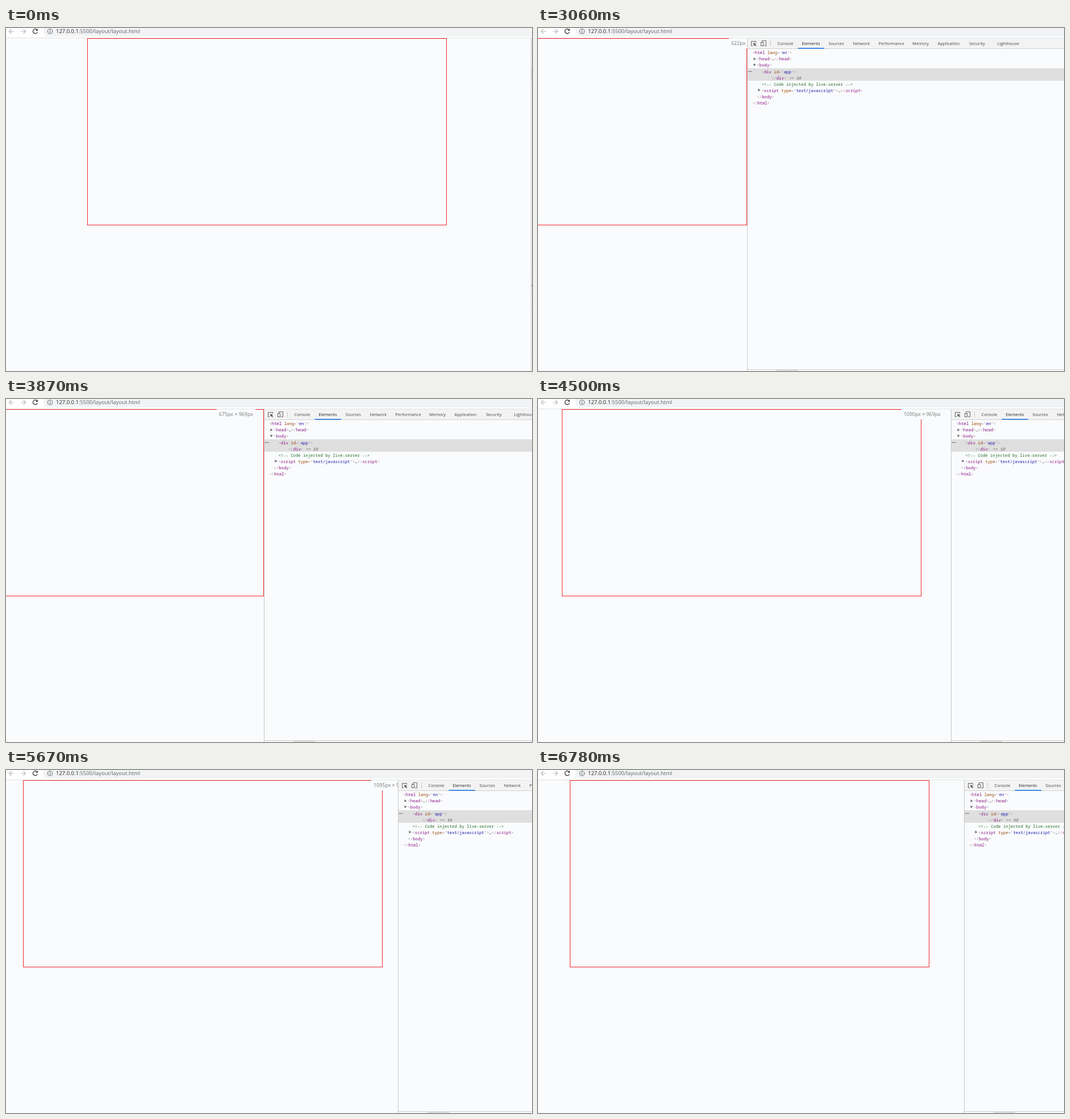
Recreate the animation shown at these times as an HTML page. Size 926 by 605 pixels, loop 7.29 s.

```html
<!DOCTYPE html>
<html lang="en">
<head>
<meta charset="utf-8">
<title>Layout resize</title>
<style>
  html, body { margin: 0; width: 100%; height: 100%; overflow: hidden; background: #f9fbfd; }
  svg { display: block; width: 926px; height: 605px; }
  text { white-space: pre; font-family: "Open Sans", "Noto Sans", sans-serif; font-size: 7.45px; fill: #444; }
  .mono { font-family: "Noto Sans Mono", "DejaVu Sans Mono", monospace; font-size: 7.25px; fill: #a894a6; }
  .url { font-size: 9.45px; fill: #5f6368; }
  .size { font-size: 8.9px; fill: #777; }
  .tag { fill: #881280; }
  .attr { fill: #994500; }
  .val { fill: #1a1aa6; }
  .note { fill: #236e25; }
  .ref { fill: #777; font-style: italic; }
  .dark { fill: #222; }
  .grey { fill: #777; }
  .prop { fill: #c80000; }
  .icon { fill: none; stroke: #5f6368; }
</style>
</head>
<body>
<svg viewBox="0 0 926 605">
  <rect width="926" height="18" fill="#fff"/>
  <path d="M926 0V15H74Q66 15 66 5V0Z" fill="#f1f3f4"/>
  <rect y="17" width="926" height="1" fill="#dfe1e4"/>
  <g class="icon" stroke-width="1.2">
    <path d="M14 6H5.5M9.5 2L5.5 6L9.5 10M26 6H34.5M30.5 2L34.5 6L30.5 10" stroke="#b8babd" style="stroke:#b8babd"/>
    <path d="M54.6 3.3A4 4 0 1 0 55.2 7.2" stroke-width="1.4" style="stroke:#444"/>
    <path d="M56 1V5H52Z" stroke="none" style="fill:#444;stroke:none"/>
    <circle cx="77.5" cy="6" r="4.1" stroke-width="1"/>
    <path d="M77.5 5.5V8.4M77.5 3.6V4.6"/>
  </g>
  <text class="url" x="88" y="9.3"><tspan class="dark">127.0.0.1</tspan>:5500/layout/layout.html</text>

  <rect id="box" y="18.5" height="329" fill="none" stroke="#f52a2a"/>
  <g id="label">
    <rect id="plate" y="18" height="18" fill="#f9fbfd"/>
    <text id="size" class="size" y="30.3"></text>
  </g>
  <g id="tools">
    <rect y="18" width="926" height="587" fill="#fafbfd"/>
    <rect y="18" width="926" height="18" fill="#f3f3f3"/>
    <rect y="36" width="926" height="1" fill="#d0d0d0"/>
    <rect y="71" width="926" height="22" fill="#dfdfdf"/>
    <g class="icon" stroke-width="1">
      <path d="M15.5 26V23.5H7.5V31.5H10"/>
      <path d="M11 26L16.5 28.2L14.3 29L16.3 31.3L15.3 32.2L13.2 29.9L12.3 31.8Z" style="fill:#555;stroke:none"/>
      <path d="M26.5 25V22.5H33.5V31.5H30"/>
      <rect x="24.5" y="25.5" width="4" height="6"/>
      <path d="M41.5 22V32" style="stroke:#ccc"/>
    </g>
    <rect x="89.5" y="35" width="46.5" height="1.5" fill="#1a73e8"/>
    <g id="tree"></g>
    <g id="docked">
      <rect y="602" width="926" height="1" fill="#ccc"/>
      <rect x="52" y="603" width="38" height="2" fill="#dedede"/>
    </g>
    <g id="stacked"></g>
    <rect y="18" width="1" height="587" fill="#c8c8c8"/>
  </g>
</svg>
<script>
const LOOP = 7290, STEP = 30, START = 2250, END = 6780;
const SCALE = 1.519, EDGE = 5, MAX_W = 632, STACK_AT = 812;

// [time, x] of the dragged divider
const drag = [
  [2250, 923], [2340, 895], [2460, 812], [2970, 437], [3015, 404.5], [3060, 368],
  [3300, 190], [3390, 151], [3450, 164], [3600, 290], [3720, 395], [3825, 439.4],
  [3870, 454], [4110, 566], [4470, 719], [4800, 805], [5115, 873.2], [5160, 879],
  [5250, 889], [5310, 889], [5400, 868], [5550, 760], [5685, 681], [5925, 681],
  [5970, 715], [6045, 840], [6105, 919.3], [6330, 919.3], [6360, 907],
  [6450, 855], [6600, 775], [6720, 750]
];

const $ = id => document.getElementById(id);
const esc = s => s.replace(/&/g, "&amp;").replace(/</g, "&lt;").replace(/>/g, "&gt;");
const text = (x, mid, body, cls = "") =>
  `<text class="${cls}" x="${x}" y="${mid + 2.6}">${body}</text>`;
const rule = y => `<rect y="${y}" width="926" height="1" fill="#d4d4d4"/>`;

function highlight(code) {
  const kinds = ["note", "ref", "tag", "attr", "val", "dark"];
  const re = /(<!--.*-->)|(== \$0)|((?<=<\/?)\w+)|(\w+(?==))|((?<=")[\w\/]+(?="))|(…)|./g;
  return code.replace(re, (m, ...groups) => {
    const k = groups.slice(0, 6).findIndex(Boolean);
    return k < 0 ? esc(m) : `<tspan class="${kinds[k]}">${esc(m)}</tspan>`;
  });
}

const tabs = [
  [53.5, "Console"], [96.5, "Elements"], [143.5, "Sources"], [186.5, "Network"],
  [231.5, "Performance"], [291, "Memory"], [335.5, "Application"],
  [391, "Security"], [440.5, "Lighthouse"]
];
const lines = [
  [9.5, '<html lang="en">'], [17.5, "<head>…</head>"], [17.5, "<body>"],
  [25.5, '<div id="app">'], [43, "</div> == $0"],
  [25.5, "<!-- Code injected by live-server -->"],
  [25.5, '<script type="text/javascript">…<\/script>'],
  [17.5, "</body>"], [9.5, "</html>"]
];
$("tree").innerHTML =
  tabs.map(([x, s]) => text(x, 27.4, s, s === "Elements" ? "dark" : "")).join("") +
  lines.map(([x, s], i) => text(x, 43.6 + i * 11.1, highlight(s), "mono")).join("") +
  `<path d="M11.5 52L15.5 54.5L11.5 57ZM10.5 63.5H15.5L13 67.5ZM19.5 107L23.5 109.5L19.5 112Z" fill="#6e6e6e"/>` +
  [2, 4.5, 7].map(x => `<rect x="${x}" y="76" width="1.4" height="1.4" fill="#555"/>`).join("");

const props = ["border: 1px solid red", "margin: 0 auto", "height: 500px", "width: 100%",
  "max-width: 960px", "min-width: 200px", "box-sizing: border-box"];
const prop = s => {
  const [name, value] = s.split(": ");
  return `${name}<tspan class="dark">: ${value};</tspan>`;
};
$("stacked").innerHTML =
  `<rect x="52" y="422" width="38" height="15" fill="#dedede"/>` +
  `<rect y="437" width="926" height="18" fill="#f3f3f3"/>` +
  [421, 436, 454, 471, 496, 585].map(rule).join("") +
  text(5, 429.7, "html", "tag") + text(30, 429.7, "body", "tag") + text(55, 429.7, "div#app", "tag") +
  text(6, 446.5, "Styles", "dark") + text(39, 446.5, "Computed") +
  `<rect y="453.5" width="33" height="1.5" fill="#1a73e8"/>` +
  text(5, 464, "Filter", "grey") +
  text(3, 479, "element.style {", "mono grey") + text(3, 489.5, "}", "mono grey") +
  text(3, 503.5, '<tspan class="dark">#app</tspan> {', "mono grey") +
  props.map((s, i) => text(15, 513.7 + i * 9.25, prop(s), "mono prop")).join("") +
  text(3, 578.5, "}", "mono grey") + text(3, 592, "* {", "mono grey") +
  `<g text-decoration="line-through">${text(15, 602.5, prop("margin: 0"), "mono prop")}</g>`;

function dividerAt(t) {
  const i = drag.findIndex(p => p[0] > t);
  if (i === 0) return drag[0][1];
  if (i < 0) return drag[drag.length - 1][1];
  const [t0, x0] = drag[i - 1], [t1, x1] = drag[i];
  return x0 + (x1 - x0) * (t - t0) / (t1 - t0);
}

function draw(time) {
  const t = Math.floor(time / STEP) * STEP;
  const idle = t < START;
  const x = idle ? 924 : Math.round(dividerAt(t));

  // The page and its size label trail the divider a little.
  const page = idle ? x : dividerAt(t - 15);
  const wide = page + EDGE > MAX_W;
  const left = wide ? Math.ceil((page - EDGE - MAX_W) / 2) - 0.5 : -EDGE;
  $("box").setAttribute("x", left);
  $("box").setAttribute("width", wide ? MAX_W : x - 0.5 - left);

  const edge = dividerAt(t - 45);
  const w = Math.round((edge + EDGE) * SCALE);
  const span = w > 999 ? 73 : 68.5;
  $("label").style.display = idle || t >= END ? "none" : "";
  $("plate").setAttribute("x", edge - span);
  $("plate").setAttribute("width", span);
  $("size").setAttribute("x", edge - span + 4);
  $("size").textContent = `${w}px × 969px`;

  const stacked = x >= STACK_AT;
  $("stacked").style.display = stacked ? "" : "none";
  $("docked").style.display = stacked ? "none" : "";
  $("tools").setAttribute("transform", `translate(${x})`);
}

const begin = performance.now();
function tick() {
  draw((performance.now() - begin) % LOOP);
  requestAnimationFrame(tick);
}
tick();
</script>
</body>
</html>
```
